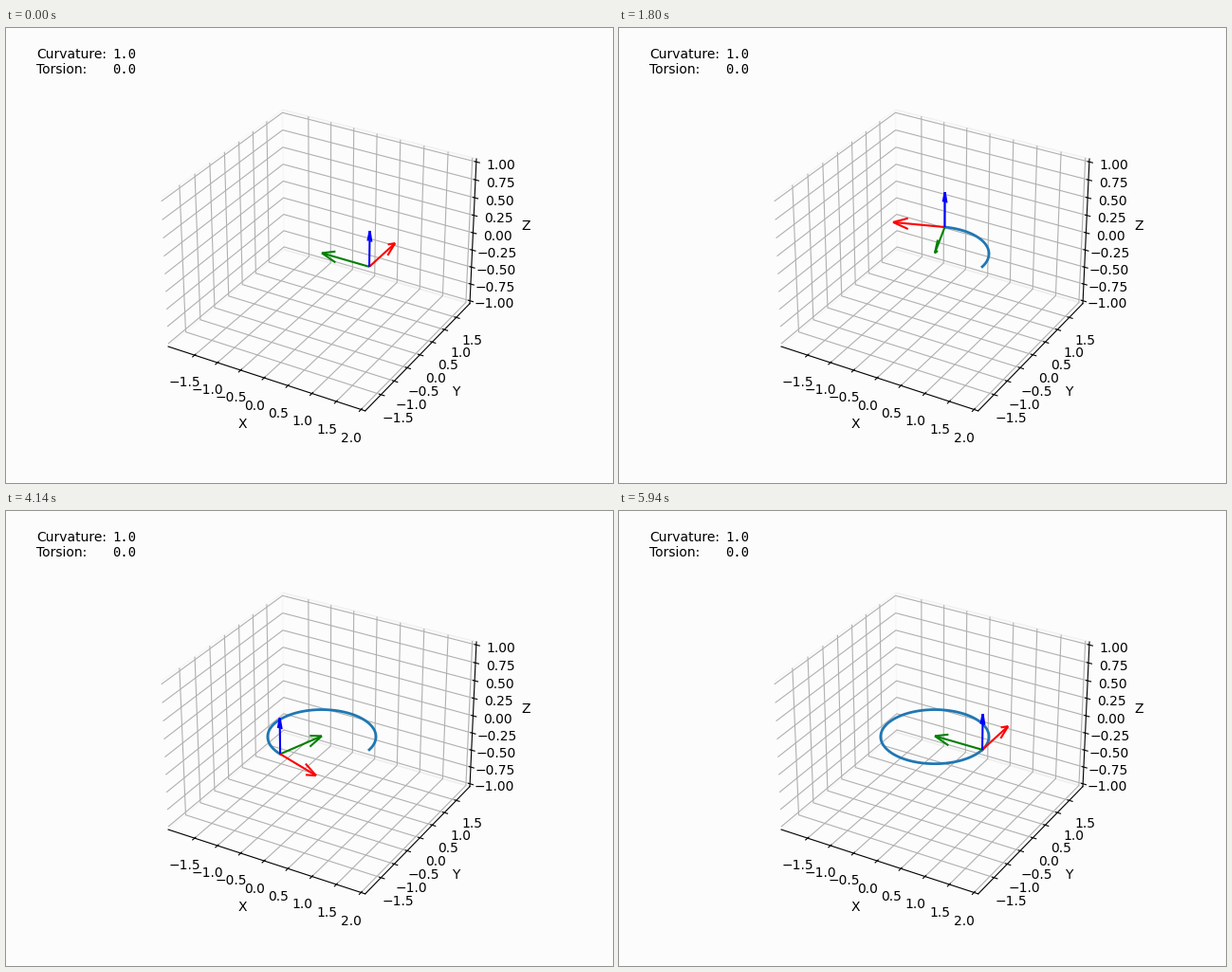
A matplotlib script for the animation above (6000 ms loop, 640 px wide and 480 px high).

```python
import numpy as np
import matplotlib.pyplot as plt
from matplotlib.animation import FuncAnimation

FRAMES = 100
INTERVAL = 60
PAPER = "#fcfcfc"
MONO = "DejaVu Sans Mono"

plt.rcParams["font.family"] = "DejaVu Sans"

theta = np.linspace(0, 2 * np.pi, FRAMES)
curve = np.array([np.cos(theta), np.sin(theta), np.zeros(FRAMES)])
tangent = np.array([-np.sin(theta), np.cos(theta), np.zeros(FRAMES)])
normal = -curve
binormal = np.array([np.zeros(FRAMES), np.zeros(FRAMES), np.full(FRAMES, 0.5)])
frame_vectors = [(tangent, "red"), (normal, "green"), (binormal, "blue")]


def padded(low, high):
    """Widen a range by 1/48 on each side."""
    pad = (high - low) / 48
    return low - pad, high + pad


fig = plt.figure(figsize=(6.4, 4.8), dpi=100, facecolor=PAPER)
ax = fig.add_subplot(projection="3d", facecolor=PAPER)

ax.set_xlim(*padded(2 * curve[0].min(), 2 * curve[0].max()))
ax.set_ylim(*padded(2 * curve[1].min(), 2 * curve[1].max()))
ax.set_zlim(*padded(-1, 1))
ax.set_xticks(np.arange(-1.5, 2.1, 0.5))
ax.set_yticks(np.arange(-1.5, 1.6, 0.5))
ax.set_zticks(np.arange(-1, 1.1, 0.25))
ax.set_xlabel("X")
ax.set_ylabel("Y")
ax.set_zlabel("Z")
for axis in (ax.xaxis, ax.yaxis, ax.zaxis):
    axis.pane.fill = False

for y, name, value in ((448, "Curvature:", 1.0), (432, "Torsion:", 0.0)):
    fig.text(0.05, y / 480, name, fontsize=10)
    fig.text(0.175, y / 480, f"{value:.1f}", fontsize=10, family=MONO)

trail, = ax.plot([], [], [], color="C0", lw=2)
arrows = []


def update(i):
    trail.set_data_3d(*curve[:, :i + 1])
    while arrows:
        arrows.pop().remove()
    for vectors, color in frame_vectors:
        arrows.append(ax.quiver(*curve[:, i], *vectors[:, i], color=color))
    return [trail, *arrows]


anim = FuncAnimation(fig, update, frames=FRAMES, interval=INTERVAL,
                     repeat=True, repeat_delay=0, blit=False)
plt.show()
```
